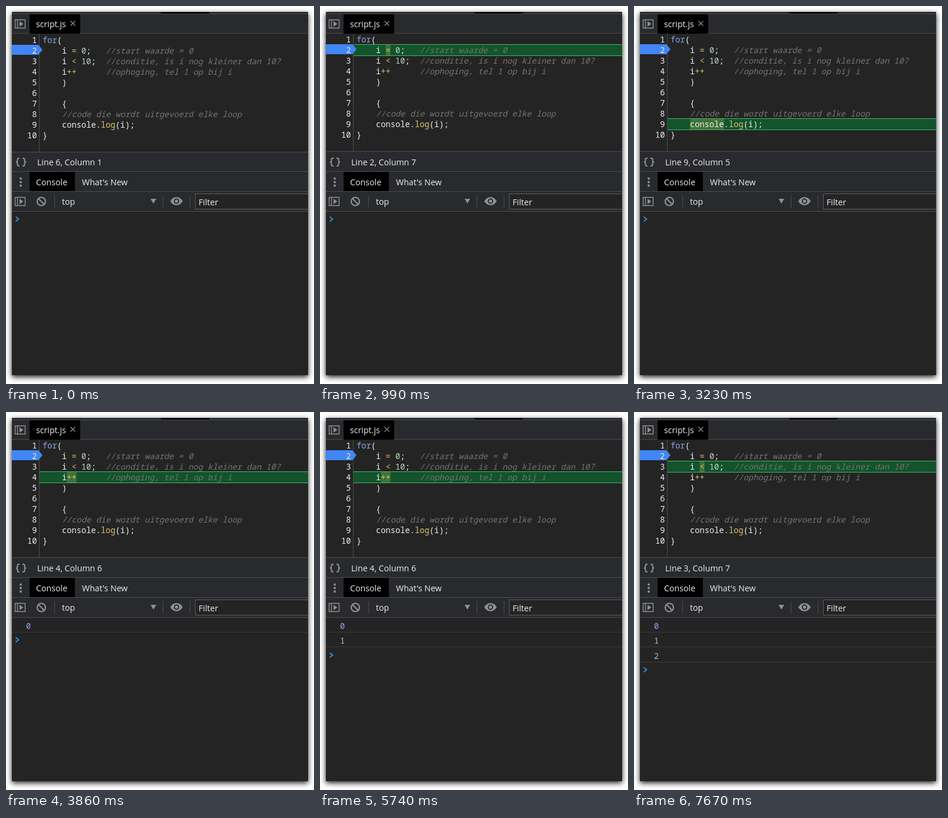
Write an HTML page that moves like this. It is 523x643 px and loops after 8000 ms.

```html
<!DOCTYPE html>
<html lang="nl">
<head>
<meta charset="utf-8">
<title>For-loop debugger</title>
<style>
  html, body { margin: 0; width: 100%; height: 100%; overflow: hidden; background: #fff; }
  svg { display: block; }
  text { white-space: pre; font: 14.2px "Open Sans", "Noto Sans", sans-serif; fill: #eee; }
  .mono text, text.mono { font: 13.75px "Noto Sans Mono", monospace; }
  .keyword { fill: #8aa6e6; }
  .operator { fill: #dcc06c; }
  .number { fill: #b9d6c2; }
  .comment { fill: #747474; font-style: italic; }
  .help text { font-size: 16.5px; fill: #fff; }
  .help .link { fill: #9a9a9a; text-decoration: underline; }
  .bar { fill: #292a2d; }
  .body { fill: #242424; }
  .rule { stroke: #4b4c4f; fill: none; }
  .icon { stroke: #919191; fill: none; }
  .solid { fill: #919191; }
  .end { text-anchor: end; }
  .middle { text-anchor: middle; }
</style>
</head>
<body>
<svg width="523" height="643" viewBox="0 0 523 643">
  <defs>
    <g id="sidebarIcon">
      <path class="icon" stroke-width="1.4" d="M15.5 23.5h17v14h-17zM19.5 23.5v14"/>
      <path class="solid" d="M23 26l6.5 4.5L23 35z"/>
    </g>
  </defs>

  <rect class="body" x="10" y="10" width="503" height="618" style="filter:drop-shadow(0 3px 5px rgba(0,0,0,.9))"/>

  <rect class="bar" x="10" y="10" width="503" height="37"/>
  <path class="rule" d="M10 13.5H513"/>
  <rect x="263" y="10" width="82" height="3"/>
  <use href="#sidebarIcon"/>

  <g id="editor">
    <rect x="40" y="14" width="86" height="33"/>
    <text x="51" y="36">script.js</text>
    <path class="icon" d="M109.5 25.5l8 8m0-8l-8 8" stroke-width="1.2"/>
    <path class="rule" d="M10 46.5H40M126 46.5H513M56.5 47V248"/>
    <g id="code" class="mono">
      <g id="highlight">
        <rect x="57" y="-14.5" width="456" height="19" fill="#14532b"/>
        <rect id="token" y="-14" height="18" fill="#417238"/>
        <path d="M57-14.5H513M57 4.5H513" stroke="#3dba6a"/>
      </g>
      <path d="M10 66H55L62 74.5 55 83H10z" fill="#4285f4"/>
      <g id="lines"></g>
    </g>
  </g>

  <g id="help" class="help">
    <rect x="10" y="47" width="503" height="201" fill="#3a3a3a"/>
    <text class="end" x="326" y="125">Ctrl + P</text>
    <text x="360" y="125">Open file</text>
    <text class="end" x="326" y="163">Ctrl + Shift + P</text>
    <text x="360" y="163">Run command</text>
    <text class="middle" x="343" y="200">Drop in a folder to add to workspace</text>
    <text class="middle link" x="343" y="238">Learn more about Workspaces</text>
  </g>

  <rect class="bar" x="10" y="248" width="503" height="101"/>
  <path id="statusRule" class="rule" d="M10 .5H513"/>
  <g id="braces" class="icon" stroke-width="2">
    <path d="M23 259h-1.5q-2 0-2 2v2q0 2-2.5 2.500q2.500.5 2.500 2.500v2q0 2 2 2H23M28 259h1.500q2 0 2 2v2q0 2 2.500 2.500q-2.500.5-2.500 2.500v2q0 2-2 2H28"/>
  </g>
  <text id="status" y="270.5"></text>

  <path class="rule" d="M10 281.500H513M10 315.500H513M10 349.500H513M82.500 322V343M266.500 322V343M312.500 322V343"/>
  <g class="solid">
    <circle cx="25" cy="293.500" r="1.900"/>
    <circle cx="25" cy="299.500" r="1.900"/>
    <circle cx="25" cy="305.500" r="1.900"/>
    <path d="M245.500 328h9.500l-4.750 8z"/>
    <path d="M279 332q4-7 10.500-7t10.500 7q-4 7-10.500 7t-10.500-7z"/>
  </g>
  <circle cx="289.500" cy="332" r="3.700" fill="#919191" stroke="#292a2d" stroke-width="2"/>
  <rect x="40" y="282" width="77" height="33"/>
  <text x="51" y="305">Console</text>
  <text x="129" y="305">What's New</text>
  <use href="#sidebarIcon" y="302"/>
  <g class="icon" stroke-width="2.200">
    <circle cx="60" cy="332.500" r="7"/>
    <path d="M55 327.500l10 10"/>
  </g>
  <text x="95" y="338">top</text>
  <path class="body" d="M321 319.500H513V345.500H321z"/>
  <path d="M513 319.500H321.500V345.500H513" fill="none" stroke="#5c5d60"/>
  <text x="327" y="339">Filter</text>

  <g id="logs"></g>
  <path id="prompt" d="M16.500 358.500l5 4-5 4" fill="none" stroke="#2f8fe0" stroke-width="1.900"/>
</svg>

<script>
const LOOP = 8000, LINE = 18, CHAR = 8.25, CODE_X = 62, LOG_ROW = 25.3;
const $ = id => document.getElementById(id);

const source = [
  "for(",
  "    i = 0;   //start waarde = 0",
  "    i < 10;  //conditie, is i nog kleiner dan 10?",
  "    i++      //ophoging, tel 1 op bij i",
  "    )",
  "",
  "    {",
  "    //code die wordt uitgevoerd elke loop",
  "    console.log(i);",
  "}"
];

const escapeHtml = s => s.replace(/</g, "&lt;");
const tokenPattern = /(\/\/.*)|(\bfor\b)|(\+\+|[=<]|\blog\b)|(\d+)|[^\/\d=<+]/g;
const colorize = line => line.replace(tokenPattern, (text, comment, keyword, operator, number) => {
  const kind = comment ? "comment" : keyword ? "keyword" : operator ? "operator" : number && "number";
  return kind ? `<tspan class="${kind}">${escapeHtml(text)}</tspan>` : text;
});

$("lines").innerHTML = source.map((line, i) => {
  const y = 63 + i * LINE;
  return `<text class="end" x="52.5" y="${y}">${i + 1}</text><text x="${CODE_X}" y="${y}">${colorize(line)}</text>`;
}).join("");

$("logs").innerHTML = [0, 1, 2].map(n => {
  const y = Math.round(n * LOG_ROW);
  const color = n ? "#a3bcd2" : "#a09cf2";
  return `<g><text class="mono" x="34" y="${369 + y}" style="fill:${color}">${n}</text>
    <path d="M10 ${374.5 + y}H513" stroke="#3b3b3b"/></g>`;
}).join("");

// Where the debugger can stop: line, column, length of the marked token
const start = [2, 7, 1], condition = [3, 7, 1], step = [4, 6, 2], call = [9, 5, 7];

const timeline = [
  { at: 0, stop: [6, 1, 0], logs: 0, idle: true },
  { at: 910, stop: [6, 1, 0], logs: 0, idle: true, closed: true },
  { at: 990, stop: start, logs: 0 },
  { at: 2620, stop: condition, logs: 0 },
  { at: 3230, stop: call, logs: 0 },
  { at: 3860, stop: step, logs: 1 },
  { at: 4640, stop: condition, logs: 1 },
  { at: 5190, stop: call, logs: 1 },
  { at: 5740, stop: step, logs: 2 },
  { at: 6220, stop: condition, logs: 2 },
  { at: 6680, stop: call, logs: 2 },
  { at: 7140, stop: step, logs: 3 },
  { at: 7600, stop: step, logs: 3, running: true },
  { at: 7670, stop: condition, logs: 3 }
];

const show = (node, visible) => node.style.display = visible ? "" : "none";
const move = (node, y) => node.setAttribute("transform", `translate(0 ${y})`);

function render({ stop: [line, column, length], logs, idle, closed, running }) {
  show($("editor"), !closed);
  show($("braces"), !closed);
  show($("help"), closed);
  show($("highlight"), !idle && !running);
  move($("code"), idle ? 0 : -1);
  move($("statusRule"), idle ? 248 : 247);
  move($("highlight"), 63 + (line - 1) * LINE - 1 + 1);
  $("token").setAttribute("x", CODE_X + (column - 1) * CHAR);
  $("token").setAttribute("width", length * CHAR);
  $("status").setAttribute("x", closed ? 18 : 53);
  $("status").textContent = `Line ${line}, Column ${column}`;
  [...$("logs").children].forEach((row, i) => show(row, i < logs));
  move($("prompt"), Math.round(logs * LOG_ROW));
}

let current;
function tick() {
  const time = performance.now() % LOOP;
  const state = timeline.findLast(entry => entry.at <= time);
  if (state !== current) render(current = state);
  requestAnimationFrame(tick);
}
tick();
</script>
</body>
</html>
```
